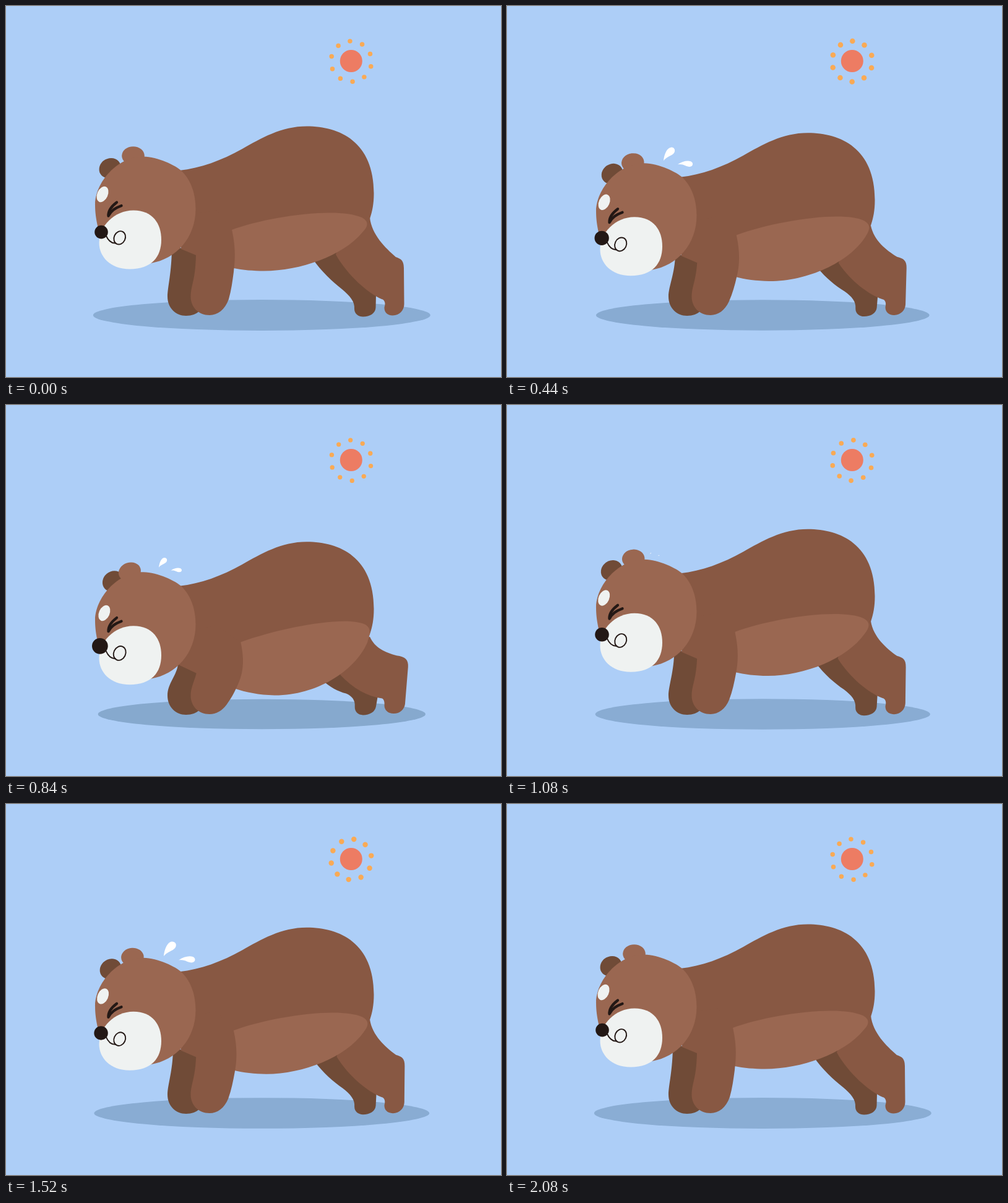
Recreate the animation shown at these times as an HTML page with a canvas. Size 800x600 px, loop 2.12 s.

```html
<!DOCTYPE html>
<html lang="en">
<head>
<meta charset="utf-8">
<title>Bear push-ups</title>
<style>
html, body { margin: 0; width: 100%; height: 100%; overflow: hidden; background: #adcef7; }
canvas { display: block; }
</style>
</head>
<body>
<canvas id="stage" width="800" height="600"></canvas>
<script>
const ctx = document.getElementById('stage').getContext('2d');
const STEP = 40, STEPS = 53, REP = 13, LOW = 6, DIP = 37.3;
const FUR = '#885843', LIGHT = '#9a6751', DARK = '#704b37', INK = '#231815', PALE = '#eff2f1';

const lerp = (a, b, t) => a + (b - a) * t;

// Each limb has a raised and a lowered outline with the same commands.
const limbs = {
  backArm: [
    'M268 390C268 430 261 455 261 470C261 488 274 501 291 501C310 501 320 490 322 470L320 395Z',
    'M282 430C280 440 261 448 261 470C261 488 274 501 291 501C310 501 320 490 322 470L320 440Z'],
  backLeg: [
    'M495 408C510 430 528 446 543 458C556 469 564 478 563 490C563 498 570 502.5 577 502.5C588 502.5 597 497 597.5 488L598 468L540 395Z',
    'M518 460C528 466 540 470 552 470C560 471 565 477 564 487C563.5 496 569 501 577 501C588 501 596 496 598 488L602 472L545 440Z'],
  frontLeg: [
    'M588 342C591 370 613 391 630 406C638 409 643 411 643 424L643.5 482C643.5 492 636 500.5 625 500.5C616 500.5 611 495 611.5 487C614 481 612 475 607 474C585 464 553 437 533 402L545 360Z',
    'M588 388C598 402 612 404 632 405C648 406 654 413 652.5 424L645.5 484C644 492 637 498.5 627 498.5C618 498.5 612 493 611.5 486C611.5 480 610 474 606 474.5C585 474 563 467 543 450L555 400Z'],
  belly: [
    'M365 362C420 341 535 324 575 342C590 350 582 360 576 366C545 404 475 428.5 417 428.5C400 428.5 382 427 368 424Z',
    'M385 392C460 366 555 347 582 360C593 366 590 378 587 392C570 443 510 487 440 486C413 485 390 480 369 472Z'],
  frontArm: [
    'M365 362C372 392 370 415 368 430C366 445 364 460 360 474C354 491 342 500 329 500C311 500 298.5 487 298.5 470C299 450 306 445 307 403L283 393L283 340L340 330Z',
    'M385 392C390 415 390 435 380 455C374 466 366 478 355 489C347 496 339 500 329 500C311 500 298.5 487 298.5 470C298.5 460 302 452 308 446L279 432L283 377L340 367Z']
};

const back = new Path2D('M270 267L280 266C315 262 348 250 382 231C412 214 445 194.5 486 194.5C540 194.5 594.5 220 594.5 303C594.5 320 592 332 588 344L578 365L540 388L370 395L300 395L280 380Z');
const head = new Path2D('M222 243.5C245 244 275 258 284 267C300 283 306.5 305 306.5 328C306.5 375 275 409 234 416L160 400C150 365 144 345 144 322C144 285 180 243.5 222 243.5Z');
const muzzle = new Path2D('M206 330.5C237 330.5 251 352 251 378C251 406 235 425.5 200 425.5C168 425.5 150.5 405 150.5 383C150.5 356 175 330.5 206 330.5Z');
const eye = new Path2D('M179 317.5C169 325 165 332 165.5 339.5C170 331 176 327 186.5 323');
const smile = new Path2D('M161.5 371C165 379 170 384 177 383.5');
const drops = [
  { path: new Path2D('M-10 11C-9 0 -4 -12 3 -12.5C11 -13 12 -4 6 0C0 4 -5 5 -10 11Z'),
    x: [229, 248, 265], y: [235, 265.5, 235] },
  { path: new Path2D('M-14 1.5C-6 -4 3 -6 9 -4C14 -2 14 5 7 5.5C0 5.5 -3 0 -14 1.5Z'),
    x: [241, 267, 293], y: [237, 274.5, 251] }
];

function morph([a, b], t) {
  const num = /-?\d+(\.\d+)?/g, ends = b.match(num);
  let i = 0;
  return new Path2D(a.replace(num, n => lerp(+n, +ends[i++], t)));
}

function fill(color, path) {
  ctx.fillStyle = color;
  ctx.fill(path);
}

function oval(x, y, rx, ry = rx, deg = 0) {
  const p = new Path2D();
  p.ellipse(x, y, rx, ry, deg * Math.PI / 180, 0, 2 * Math.PI);
  return p;
}

function stroke(path, width) {
  ctx.strokeStyle = INK;
  ctx.lineWidth = width;
  ctx.stroke(path);
}

function drawSun(n) {
  fill('#ed7c63', oval(557.8, 89, 18));
  const size = 3.95 + 0.33 * Math.sin((n - 3) * 2 * Math.PI / 26);
  for (let i = 0; i < 10; i++) {
    const a = (-93.6 + 36 * i + 360 * n / 52) * Math.PI / 180;
    fill('#f9aa55', oval(558 + 32.8 * Math.cos(a), 89.6 + 32.8 * Math.sin(a), size));
  }
}

function drawHead(p) {
  const at = (a, b) => lerp(a, b, p), dy = DIP * p;
  fill(DARK, oval(at(168, 175), at(262.3, 294), 18, 15.8, at(-30, -45)));
  fill(LIGHT, oval(at(205.5, 197.7), at(242.2, 280.8), 18.3, 15, at(0, -25)));
  ctx.save();
  ctx.translate(0, dy);
  fill(LIGHT, head);
  fill(PALE, muzzle);
  stroke(eye, 4.3);
  stroke(smile, 1.9);
  stroke(oval(183.7, 374.8, at(9, 9.8), at(11, 12), 25), 1.9);
  ctx.restore();
  fill(PALE, oval(at(156, 160), at(304.5, 349.3), 8.6, 13.3, 24));
  fill(INK, oval(at(154, 151), at(365.6, 399.5), at(10.8, 13.7)));
}

function drawDrops(k) {
  const i = k < LOW ? 0 : 1, t = (k - i * LOW) / LOW;
  for (const d of drops) {
    ctx.save();
    ctx.translate(lerp(d.x[i], d.x[i + 1], t), lerp(d.y[i], d.y[i + 1], t));
    ctx.scale(k / 12, k / 12);
    fill('#fff', d.path);
    ctx.restore();
  }
}

function draw(n) {
  const k = n % REP;
  const p = k <= LOW ? k / LOW : (REP - k) / (REP - LOW);
  const limb = (color, name) => fill(color, morph(limbs[name], p));

  ctx.fillStyle = '#adcef7';
  ctx.fillRect(0, 0, 800, 600);
  drawSun(n);
  const shade = [[138, 132], [173, 167], [212, 204]].map(([a, b]) => Math.round(lerp(a, b, p)));
  fill(`rgb(${shade})`, oval(413.3, 500, lerp(272.5, 261.5, p), lerp(25, 24, p)));

  limb(DARK, 'backArm');
  limb(DARK, 'backLeg');
  limb(FUR, 'frontLeg');
  ctx.save();
  ctx.translate(0, DIP * p);
  fill(FUR, back);
  ctx.restore();
  limb(LIGHT, 'belly');
  limb(FUR, 'frontArm');
  drawHead(p);
  if (k) drawDrops(k);
}

ctx.lineCap = ctx.lineJoin = 'round';
const start = performance.now();
function tick(now) {
  draw(Math.floor(Math.max(0, now - start) / STEP) % STEPS);
  requestAnimationFrame(tick);
}
draw(0);
requestAnimationFrame(tick);
</script>
</body>
</html>
```
